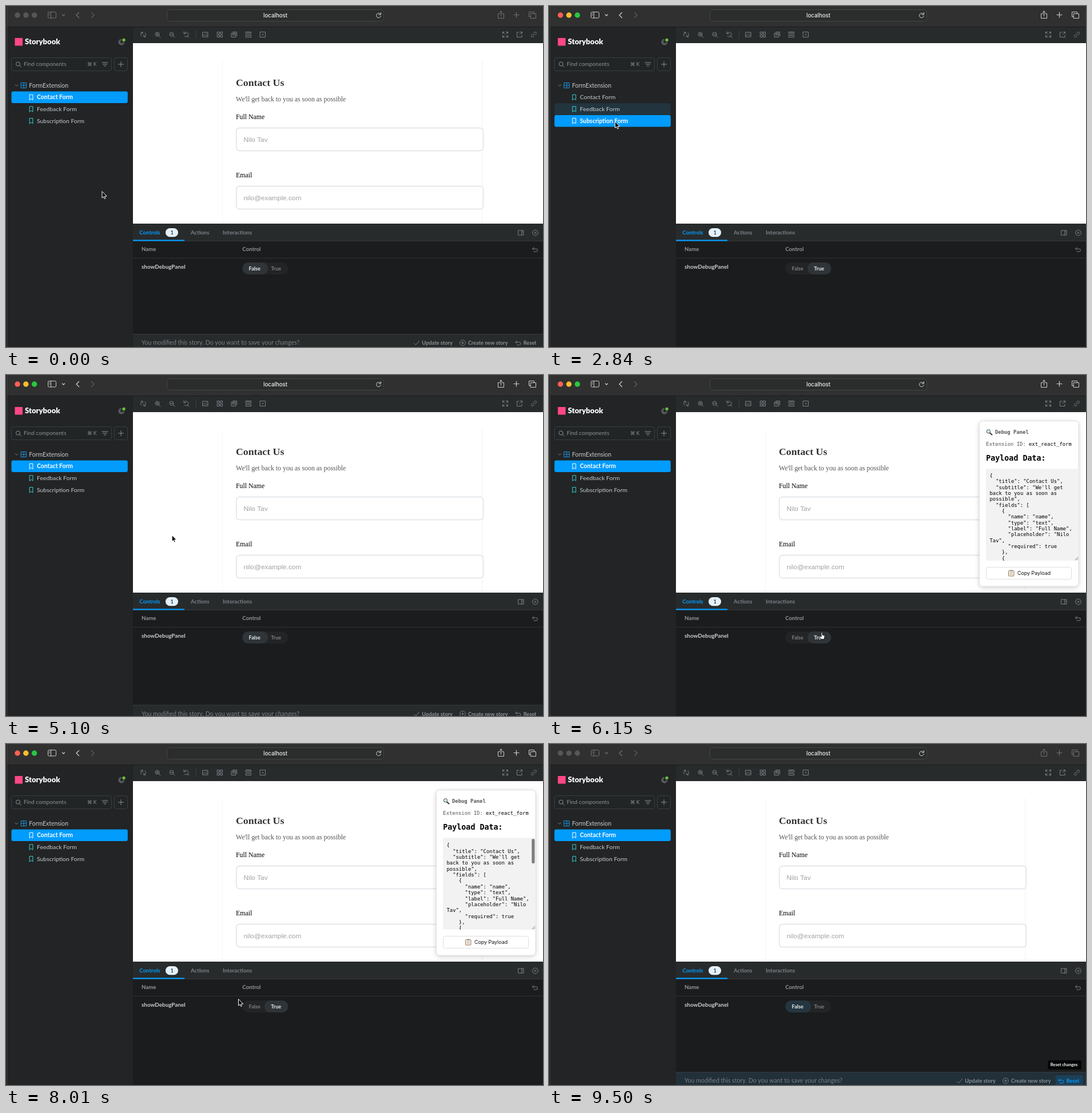
An HTML page with a canvas for the animation above (9940 ms loop, 939x597 px).

```html
<!DOCTYPE html>
<html lang="en">
<meta charset="utf-8">
<title>Form stories</title>
<style>
  html, body { margin: 0; height: 100%; overflow: hidden; background: #1b1c1d; }
  canvas { display: block; }
</style>
<canvas id="stage" width="939" height="597"></canvas>
<script>
const LOOP = 9940;
const ctx = document.getElementById('stage').getContext('2d');
const UI = 'Lato, sans-serif', SYS = 'Inter, sans-serif', SANS = '"Liberation Sans", sans-serif';
const SERIF = '"Liberation Serif", serif', MONO = '"DejaVu Sans Mono", monospace';
const BLUE = '#029cfd', MUTED = '#798186', TEXT = '#c9cdcf', LINE = '#37393b';
const LINE_HEIGHT = 10.36, COLUMNS = 27;

const field = (name, type, label, placeholder) => ({ name, type, label, placeholder, required: true });
const radio = (name, label, options) => ({ name, type: 'radio', label, options, required: true });
const forms = {
  contact: {
    title: 'Contact Us', subtitle: "We'll get back to you as soon as possible",
    fields: [
      field('name', 'text', 'Full Name', 'Nilo Tav'),
      field('email', 'email', 'Email', 'nilo@example.com'),
      field('subject', 'text', 'Subject', 'How can we help?'),
      field('message', 'textarea', 'Message', 'Your message'),
      radio('preferred_contact', 'Preferred Contact Method', ['Email', 'Phone', 'Either']),
    ],
    submitText: 'Send Message',
  },
  feedback: {
    title: 'Share Your Experience', subtitle: 'Help us improve our service',
    fields: [radio('rating', 'How would you rate your experience?', ['Excellent', 'Good', 'Fair', 'Poor'])],
    submitText: 'Submit Feedback',
  },
  subscription: {
    title: 'Stay Updated', subtitle: 'Subscribe to our newsletter',
    fields: [
      field('email', 'email', 'Email', 'nilo@example.com'),
      radio('frequency', 'Frequency', ['Daily', 'Weekly', 'Monthly']),
    ],
    submitText: 'Subscribe',
  },
};
const stories = [['contact', 'Contact Form'], ['feedback', 'Feedback Form'], ['subscription', 'Subscription Form']];

// start time, selected story, debug panel shown
const scenes = [
  [0, 'contact', false], [1120, 'feedback', true], [2840, 'subscription', true],
  [4040, 'feedback', true], [4990, 'contact', false], [6030, 'contact', true], [8610, 'contact', false],
];
const pointer = [
  [180, 168, 325], [950, 113, 182], [1720, 113, 182], [2010, 114, 200], [2300, 114, 200], [2480, 115.5, 202.5],
  [3200, 115.5, 202.5], [3620, 113.5, 180], [4100, 113.5, 180], [4450, 112, 158], [4990, 112, 158],
  [5220, 488, 417], [5450, 488, 417], [5860, 477, 451], [6150, 477, 451], [6510, 878, 223],
  [7790, 878, 223], [8010, 406.5, 447], [8130, 390, 444], [8310, 390, 444], [8430, 425, 455],
  [8650, 425, 455], [9020, 896, 588], [9200, 896, 588], [9260, 896, 599],
];
// share of the full scroll height
const scrolling = [[6810, 0], [7300, 1], [7390, 1], [7770, -0.01], [8010, -0.0035], [8130, 0]];

function track(keys, t) {
  const i = keys.findIndex(k => k[0] > t);
  if (i === 0) return keys[0].slice(1);
  if (i < 0) return keys[keys.length - 1].slice(1);
  const a = keys[i - 1], b = keys[i], u = (t - a[0]) / (b[0] - a[0]), e = u * u * (3 - 2 * u);
  return a.slice(1).map((v, j) => v + (b[j + 1] - v) * e);
}

function wrap(line) {
  const rows = [];
  while (line.length > COLUMNS) {
    const cut = line.lastIndexOf(' ', COLUMNS);
    rows.push(line.slice(0, cut));
    line = line.slice(cut + 1);
  }
  return [...rows, line];
}
for (const form of Object.values(forms)) form.rows = JSON.stringify(form, null, 2).split('\n').flatMap(wrap);

function text(s, x, y, size, color, family = UI, weight = 400) {
  ctx.font = `${weight} ${size}px ${family}`;
  ctx.fillStyle = color;
  ctx.fillText(s, x, y);
}
function rect(x, y, w, h, color) {
  ctx.fillStyle = color;
  ctx.fillRect(x, y, w, h);
}
function box(x, y, w, h, r, fill, stroke, width = 1) {
  ctx.beginPath();
  ctx.roundRect(x, y, w, h, r);
  if (fill) { ctx.fillStyle = fill; ctx.fill(); }
  if (stroke) { ctx.strokeStyle = stroke; ctx.lineWidth = width; ctx.stroke(); }
}
const dot = (x, y, r, fill, stroke, width) => box(x - r, y - r, 2 * r, 2 * r, r, fill, stroke, width);
function icon(d, x, y, color, width = 1, fill) {
  const path = new Path2D(d);
  ctx.save();
  ctx.translate(x, y);
  ctx.lineJoin = ctx.lineCap = 'round';
  if (fill) { ctx.fillStyle = fill; ctx.fill(path); }
  ctx.strokeStyle = color;
  ctx.lineWidth = width;
  ctx.stroke(path);
  ctx.restore();
}

const LENS = 'M3 -.5A3.5 3.5 0 1 1 -4 -.5A3.5 3.5 0 1 1 3 -.5M2 2L5 5';
const PLUS = 'M-4.5 0H4.5M0 -4.5V4.5';
const UNDO = 'M-2 -4L-4.5 -1.5L-2 1M-4.5 -1.5H2A2.5 2.5 0 0 1 2 3.5H-2';
const RELOAD = 'M3.5 -2A4 4 0 1 0 4 1M4 -5V-1.5H.5';
const FRAME = 'M-4.5 -4.5H4.5V4.5H-4.5Z';
const toolbar = [
  [240, 'M-3 3A4 4 0 0 1 -1 -4M3 -3A4 4 0 0 1 1 4M-4 -4H-1V-1M4 4H1V1'],
  [265, LENS + 'M-2.3 -.5H1.3M-.5 -2.3V1.3'], [290, LENS + 'M-2.3 -.5H1.3'],
  [315, 'M-3.5 -2A4 4 0 1 1 -3 2.5M-4 -5V-1.5H-.5M1.5 2L5 5'],
  [348.5, 'M-4.5 -4H4.5V4H-4.5ZM-4 2L-1.5 -.5L1 2L2.5 .5L4 2M1.5 -2H2.3'],
  [374, 'M-4.5 -4.5H-1V-1H-4.5ZM1 -4.5H4.5V-1H1ZM-4.5 1H-1V4.5H-4.5ZM1 1H4.5V4.5H1Z'],
  [399, 'M-4.5 -2.5H2.5V4.5H-4.5ZM-2.5 -4.5H4.5V2.5M-3 -1H1M-3 1H1'],
  [424, 'M-4.5 -4.5H4.5V-1H-4.5ZM-4.5 1.5H4.5V4.5H-4.5ZM-2 -4V-3M0 -4V-3M2 -4V-3'],
  [449, FRAME + 'M-1 0H1M0 -1V1'],
  [873, 'M-1.5 -1.5L-4.5 -4.5M-4.5 -1.5V-4.5H-1.5M1.5 -1.5L4.5 -4.5M4.5 -1.5V-4.5H1.5M-1.5 1.5L-4.5 4.5M-4.5 1.5V4.5H-1.5M1.5 1.5L4.5 4.5M4.5 1.5V4.5H1.5'],
  [898, 'M-1 -4H-4.5V4.5H4V1M1.5 -4.5H4.5V-1.5M4.5 -4.5L0 0'],
  [923, 'M-1 1L1 -1M-.5 -2.5L1.5 -4.2A2 2 0 0 1 4.2 -1.5L2.5 .5M.5 2.5L-1.5 4.2A2 2 0 0 1 -4.2 1.5L-2.5 -.5'],
];

function drawTitleBar(active) {
  rect(0, 0, 939, 36, '#2f302f');
  ['#ff5f57', '#febc2e', '#28c840'].forEach((c, i) => dot(20 + i * 14.8, 16, 4.7, active ? c : '#565757'));
  const c = active ? '#cdcdcc' : '#707171';
  box(73.5, 10.5, 14, 10.5, 2, null, c);
  icon('M-2 -5V5M-5 -2.5H-4M-5 0H-4', 80.5, 15.8, c);
  icon('M-2 -1L0 1L2 -1', 100.5, 16, c, 1.3);
  icon('M2 -4.5L-2.5 0L2 4.5', 125.5, 16, c, 1.3);
  icon('M-2 -4.5L2.5 0L-2 4.5', 151.5, 16, '#5c5d5d', 1.3);
  icon('M-2 -2H-5V6H5V-2H2M0 2.5V-6.5M-2.5 -4L0 -6.5L2.5 -4', 865.5, 15.5, c);
  icon(PLUS, 892.5, 15.5, c, 1.2);
  icon('M-3 -2.5H6V5.5H-3ZM-3 2.5H-6V-5.5H3V-2.5', 920.5, 16, c);
  box(281.5, 6.5, 379, 20, 5, '#2b2c2c', '#454646');
  text('localhost', 450, 19.7, 9.7, '#f0f0f0', SYS, 500);
  icon(RELOAD, 651.5, 16.5, '#d5d5d5');
}

function drawSidebar(selected, hovered) {
  rect(0, 36, 222, 561, '#222425');
  box(15.5, 56, 13.5, 13.5, 0, '#ff4785');
  text('Storybook', 33, 67.3, 13.1, '#fff', UI, 900);
  icon('M-1 -4.5A4.7 4.7 0 1 0 4.5 1M-1 -2.5A2.8 2.8 0 1 0 2.5 1', 202, 63, '#8d9599');
  dot(206, 59.5, 2.7, '#66bf3c');
  box(9.5, 90.5, 175, 23, 3.5, '#222526', '#3b3e40');
  box(189.5, 90.5, 23, 23, 3.5, '#222526', '#3b3e40');
  icon(LENS, 21.5, 102, '#8b9296');
  text('Find components', 31, 105.3, 9.8, '#8b9296');
  text('⌘ K', 142, 105.3, 8.6, '#8b9296');
  icon('M-5 -3H5M-3.5 0H3.5M-1.5 3H1.5', 173, 102, '#8b9296');
  icon(PLUS, 201, 102, '#8b9296');
  icon('M-2.5 -1.2L0 1.3L2.5 -1.2', 18.5, 139, MUTED);
  icon(FRAME + 'M-4.5 0H4.5M0 -4.5V4.5', 31, 139, '#1a95e0');
  text('FormExtension', 40.3, 142.7, 10.45, TEXT);
  stories.forEach(([id, label], i) => {
    const y = 149.5 + i * 20.7, on = id === selected;
    if (on || i === hovered) box(9.5, y, 203.3, 20.5, 3, on ? BLUE : '#22353f');
    icon('M-2.7 -4.7H2.7V4.7L0 2.3L-2.7 4.7Z', 44.2, y + 10.4, on ? '#fff' : '#37d5d3');
    text(label, 54, y + 13.9, 10.4, on ? '#fff' : TEXT, UI, on ? 700 : 400);
  });
}

function drawForm(form) {
  rect(378, 95, 1, 286, '#f4f4f4');
  rect(832.5, 95, 1, 286, '#f2f2f2');
  text(form.title, 402, 140.3, 17.76, '#333', SERIF, 700);
  text(form.subtitle, 402, 167, 11.84, '#555', SERIF);
  let y = 194;
  for (const f of form.fields) {
    text(f.label, 402, y + 4, 11.84, '#000', SERIF);
    if (f.options) {
      f.options.forEach((option, i) => {
        const cy = y + 38 + i * 37;
        dot(414.8, cy, 5.7, '#fff', '#d2d2d2');
        text(option, 431.7, cy + 4, 11.84, '#000', SERIF);
      });
    } else {
      box(402.8, y + 19.5, 431.6, 40, 5.5, '#fff', '#dde1e6', 1.4);
      text(f.placeholder, 415.5, y + 44, 11.84, '#a2a2a2', SANS);
    }
    y += 102;
  }
}

function drawDebugPanel(form, t) {
  ctx.save();
  ctx.shadowColor = 'rgba(0,0,0,.2)';
  ctx.shadowBlur = 9;
  ctx.shadowOffsetY = 2;
  box(752.5, 80.5, 173.5, 289.5, 6, '#fff');
  ctx.restore();
  box(752.5, 80.5, 173.5, 289.5, 6, null, '#e0e0e0');
  icon('M1.5 2L5 5', 769.5, 99.5, '#333', 2);
  dot(768.5, 98.7, 3.2, '#cfe4ef', '#555');
  text('Debug Panel', 780, 103, 8.88, '#555', MONO, 700);
  text('Extension ID:', 764.3, 124, 8.88, '#555', MONO);
  text('ext_react_form', 839, 124, 8.88, '#000', MONO);
  text('Payload Data:', 764.3, 150, 13.32, '#000', MONO, 700);

  const share = track(scrolling, t)[0];
  const offset = share * ((form.rows.length - 1) * LINE_HEIGHT - 140);
  ctx.save();
  ctx.beginPath();
  ctx.roundRect(764, 164.3, 162, 160.7, [3, 0, 0, 3]);
  ctx.clip();
  rect(764, 164, 162, 161, '#f2f2f2');
  form.rows.forEach((row, i) => text(row, 770.5, 178.8 + i * LINE_HEIGHT - offset, 8.88, '#000', MONO));
  if (t > 6810 && t < 8130) {
    ctx.globalAlpha = Math.min(1, (8130 - t) / 100);
    box(919.3, 166 + 114 * Math.max(0, share), 5.2, 43, 2.6, '#7f7f7f');
  }
  ctx.restore();
  icon('M-2.5 2.5L2.5 -2.5M.5 2.5L2.5 .5', 922.5, 321.5, '#666', 0.8);

  box(764.5, 336.5, 149, 21, 3, '#fff', '#dedede');
  box(803.5, 342.5, 9.5, 9.5, 1, '#f4f1e6', '#a3764d');
  rect(806, 341.5, 4.5, 2, '#888');
  icon('M-2.5 -1H2.5M-2.5 1H2.5M-2.5 3H2.5', 808.3, 346.5, '#aaa', 0.7);
  text('Copy Payload', 819, 350.4, 8.9, '#111', SYS);
}

function drawControls(on, tinted) {
  rect(222, 381, 717, 31, '#282b2c');
  rect(222, 411, 717, 1, LINE);
  rect(222, 409.3, 90, 2.2, BLUE);
  text('Controls', 233.3, 400.3, 9.6, BLUE, UI, 700);
  box(279, 389, 22, 15.3, 7.6, '#e3f1fc');
  text('1', 287.7, 399.9, 8.6, '#2e3438', UI, 700);
  text('Actions', 323, 400.3, 9.6, MUTED, UI, 700);
  text('Interactions', 379, 400.3, 9.6, MUTED, UI, 700);
  icon('M-4.5 -4H4.5V4H-4.5ZM1.3 -4V4M3 -2H3M3 0H3', 900.5, 397, MUTED);
  dot(925.5, 397, 4.9, null, MUTED);
  icon('M-1.8 -1.8L1.8 1.8M1.8 -1.8L-1.8 1.8', 925.5, 397, MUTED);

  rect(222, 412, 717, 185, '#1b1c1d');
  text('Name', 237, 429.3, 9.6, '#92989b', UI, 700);
  text('Control', 413.3, 429.3, 9.6, '#92989b', UI, 700);
  icon(UNDO, 925, 426.5, MUTED);
  rect(222, 441, 717, 1, '#303233');
  text('showDebugPanel', 237, 459.7, 9.9, TEXT, UI, 700);
  box(413.3, 449, 80, 21, 10.5, '#222425');
  if (on) box(452, 449, 41.5, 21, 10.5, '#2e3438');
  else box(413.3, 449, 45, 21, 10.5, tinted ? '#243640' : '#2e3438');
  text('False', 424.6, 463, 9.1, on ? MUTED : '#e6eaec', UI, 700);
  text('True', 463.3, 463, 9.1, on ? '#e6eaec' : MUTED, UI, 700);
}

function drawSaveBar(shift, tinted, hover) {
  ctx.save();
  ctx.translate(0, shift);
  rect(222, 574, 717, 30, tinted ? '#22303a' : '#282b2c');
  rect(222, 574, 717, 1, LINE);
  if (hover) box(885.5, 580, 48.5, 22, 3, '#1c4059');
  text('You modified this story. Do you want to save your changes?', 237, 593, 10.6, MUTED);
  icon('M-4.5 .5L-1.5 3.5L4.5 -3.5', 718, 590, MUTED);
  text('Update story', 727.3, 593, 9.25, '#8a9297', UI, 700);
  dot(798.5, 589.7, 4.9, null, MUTED);
  icon('M-2.2 0H2.2M0 -2.2V2.2', 798.5, 589.7, MUTED);
  text('Create new story', 808, 593, 9.15, '#8a9297', UI, 700);
  icon(UNDO, 895.5, 590, hover ? BLUE : MUTED);
  text('Reset', 904.7, 593, 9.2, hover ? BLUE : '#8a9297', UI, 700);
  ctx.restore();
  if (hover) {
    box(872.3, 553.7, 58.7, 16.3, 3, '#050606');
    text('Reset changes', 876.8, 564.4, 7.5, '#fff', UI, 700);
  }
}

function drawPointer(x, y, panel) {
  const inside = (l, t, r, b) => x > l && x < r && y > t && y < b;
  if (panel && inside(764, 164, 919, 325)) {
    icon('M-2 -5.5Q0 -5.5 0 -4V4Q0 5.5 -2 5.5M2 -5.5Q0 -5.5 0 -4M0 4Q0 5.5 2 5.5M-1 1.5H1', x, y, '#222');
  } else if (inside(413, 447, 493, 470) || inside(886, 580, 935, 600)) {
    icon('M-1 0Q0 -1 1 0V4L4.5 5Q5.5 5.5 5 7L4 11.5H-1.5L-4 7.5Q-4.5 6 -3 6L-1 7Z', x, y, '#000', 0.8, '#fff');
  } else {
    icon('M0 0V11L2.5 8.7L4.2 12.5L6 11.7L4.4 8H7.8Z', x, y, '#fff', 1, '#000');
  }
}

function draw(t) {
  const [start, story, panel] = scenes.filter(s => s[0] <= t).pop();
  const [x, y] = track(pointer, t);
  const form = forms[story], tinted = t >= 8610;
  const loading = t >= 2840 && t < 2900;
  const row = x < 213 ? Math.floor((y - 149.5) / 20.7) : -1;

  rect(0, 0, 939, 597, '#1b1c1d');
  drawTitleBar(t >= 180 && t < 9500);
  drawSidebar(story, loading ? 1 : row);
  rect(222, 36, 717, 29, '#282b2c');
  rect(0, 36, 939, 1, '#1a1b1b');
  toolbar.forEach(([cx, d]) => icon(d, cx, 50, MUTED));
  rect(332, 43, 1, 14, '#3c4042');

  ctx.save();
  ctx.beginPath();
  ctx.rect(222, 65, 717, 316);
  ctx.clip();
  rect(222, 65, 717, 316, '#fff');
  if (!loading) {
    drawForm(form);
    if (panel) drawDebugPanel(form, t);
  }
  ctx.restore();

  drawControls(panel, tinted);
  if (!panel) {
    const slide = start ? Math.max(0, 1 - (t - start) / 180) : 0;
    drawSaveBar(24 * slide * slide, tinted, t >= 8980);
  }
  rect(0, 0, 1, 597, '#101111');
  rect(1, 0, 1, 597, '#48494a');
  if (t < 9260) drawPointer(x, y, panel);
}

function tick() {
  draw(performance.now() % LOOP);
  requestAnimationFrame(tick);
}
tick();
</script>
</html>
```
